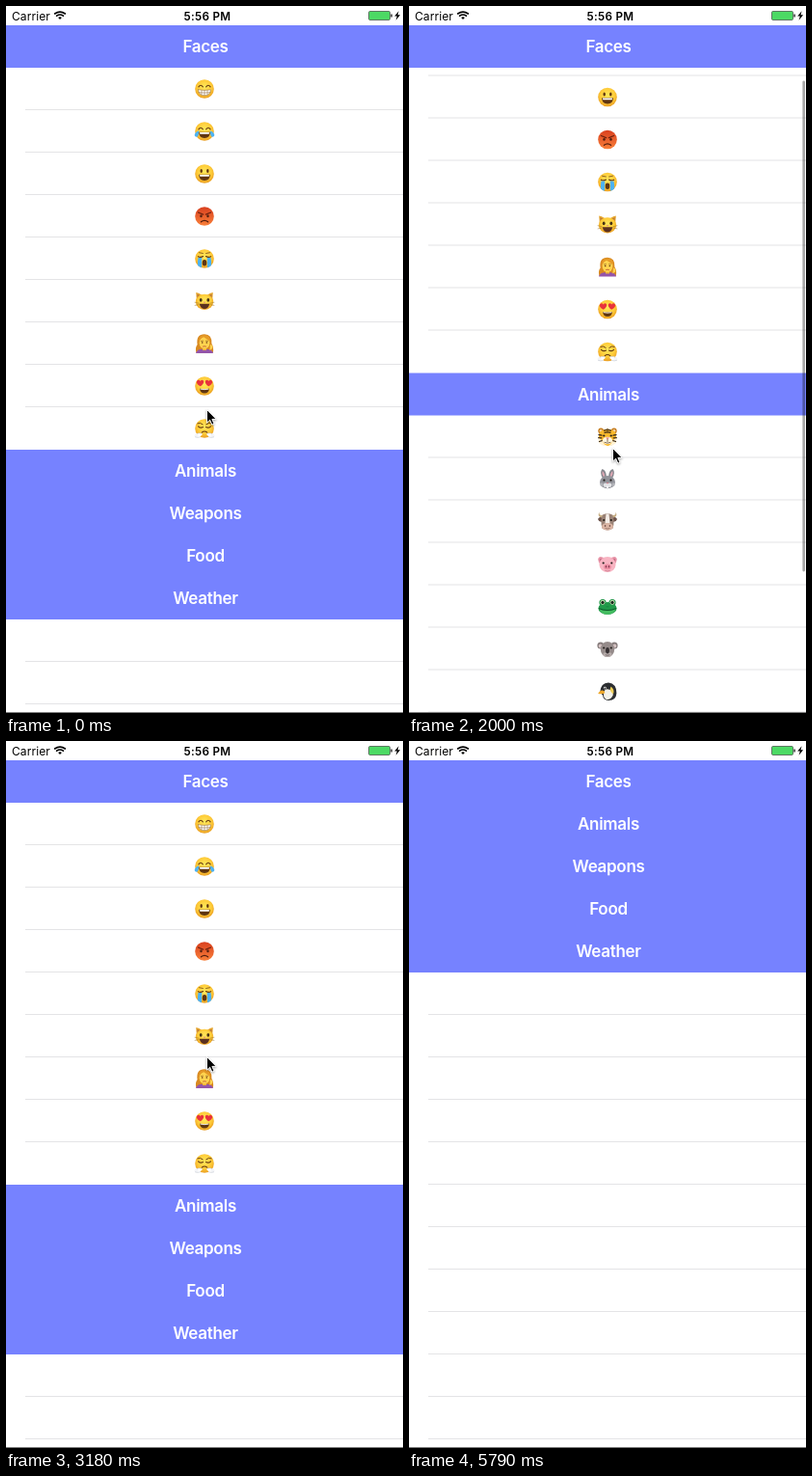
These frames come from a looping animation (412 by 733 pixels, 6390 ms). An HTML page:

```html
<!DOCTYPE html>
<html lang="en">
<head>
<meta charset="utf-8">
<title>Emoji list</title>
<style>
  html, body { margin: 0; width: 100%; height: 100%; overflow: hidden; background: #fff; }
  svg { display: block; }
  text { font-family: Inter, Roboto, "Liberation Sans", sans-serif; }
  .title { font-size: 17px; font-weight: 600; letter-spacing: -.3px; fill: #fff; text-anchor: middle; }
</style>
</head>
<body>
<svg id="stage" width="412" height="733" viewBox="0 0 412 733">
  <defs>
    <radialGradient id="yellow" cx=".5" cy=".4" r=".62">
      <stop offset="0" stop-color="#ffe95c"/><stop offset=".6" stop-color="#fecb38"/><stop offset="1" stop-color="#e89a20"/>
    </radialGradient>
    <linearGradient id="red" x2="0" y2="1">
      <stop offset="0" stop-color="#d9401f"/><stop offset="1" stop-color="#f9803a"/>
    </linearGradient>
  </defs>
</svg>
<script>
const LOOP = 6390, ROW = 44, HEAD = '#7682ff', LINE = '#e4e4e6';
const BROWN = '#5f3510', BLUE = '#4db2f2', Y = 'url(#yellow)';

// Shape helpers, all returning SVG markup
const oval = (x, y, rx, ry, fill) => `<ellipse cx="${x}" cy="${y}" rx="${rx}" ry="${ry}" fill="${fill}"/>`;
const dot = (x, y, r, fill) => oval(x, y, r, r, fill);
const fillPath = (d, fill) => `<path d="${d}" fill="${fill}"/>`;
const stroke = (d, color = BROWN, w = 1.1) =>
  `<path d="${d}" fill="none" stroke="${color}" stroke-width="${w}" stroke-linecap="round" stroke-linejoin="round"/>`;
const twin = s => s + `<g transform="scale(-1 1)">${s}</g>`;
const rect = (x, y, w, h, fill) => `<rect x="${x}" y="${y}" width="${w}" height="${h}" fill="${fill}"/>`;
const group = (s, x = 0, y = 0, id = '') => `<g ${id && `id="${id}"`} transform="translate(${x} ${y})">${s}</g>`;

const ball = dot(0, 0, 9.8, Y);
const eyes = (y, color = BROWN) => twin(oval(3.3, y, 1.2, 1.9, color));
const happyEyes = twin(stroke('M1.7 -2.2Q3.9 -5.2 6.1 -2.2'));
const laugh = fillPath('M-6 .8H6Q5.6 7 0 7T-6 .8Z', BROWN) + fillPath('M-5.2 1H5.2L4.7 2.8H-4.7Z', '#fff');
const heart = twin(fillPath('M4.2 .2C-.2 -2.4 .2 -6.2 2.4 -6.2Q3.7 -6.2 4.3 -5Q5.2 -6.6 6.9 -6.1C9.4 -5 8 -1.6 4.2 .2Z', '#e8323c'));

const faces = [
  ball + happyEyes + fillPath('M-6.5 .8Q0 2 6.5 .8Q6 6.8 0 6.8T-6.5 .8Z', '#fff')
    + stroke('M-6.5 .8Q0 2 6.5 .8Q6 6.8 0 6.8T-6.5 .8ZM-6 3.6Q0 4.6 6 3.6M-3 1.5V6M0 1.5V6.6M3 1.5V6', '#9a7a52', .6),
  ball + happyEyes + laugh + twin(fillPath('M5.6 -.8Q11.2 1.2 10.1 4.8Q8 7 6.5 4.2Z', BLUE)),
  ball + eyes(-3) + laugh,
  dot(0, 0, 9.8, 'url(#red)') + twin(stroke('M1.4 -1.8L6.6 -4', '#70210f', 1.3) + oval(3.5, -.2, 1.2, 1.5, '#54200f'))
    + stroke('M-3.6 5.8Q0 2.8 3.6 5.8', '#54200f', 1.2),
  ball + twin(stroke('M1.6 -5.5L5.5 -6.3', BROWN, .7) + stroke('M1.5 -2.5Q4 -.8 6.7 -2.3')
    + fillPath('M2.7 -1H6.6Q7.3 3 7 7.1Q5 8.9 3 9.3Z', BLUE)) + oval(0, 4.2, 2.3, 3.2, BROWN),
  twin(fillPath('M-8.8 -9Q-2.8 -7.6 -1 -4L-8 1Z', '#e5a52c') + fillPath('M-7.6 -7.3L-3.8 -5.2L-7.2 -2Z', '#b9763a'))
    + oval(0, .8, 9.2, 8.1, Y) + twin(oval(3.8, -1.2, 1.4, 1.9, '#473315') + stroke('M6 2.2L10 1.3M6 3.6L9.9 4.4', '#967026', .5))
    + fillPath('M-5.3 2.8H5.3Q4 8 0 8T-5.3 2.8Z', '#5b3020') + fillPath('M-1.4 .7H1.4L0 2.1Z', '#db7584'),
  fillPath('M-8.6 9.5Q-10 4 -7.4 1Q-9 -9.6 0 -9.8Q8 -9.6 7.4 0Q10 4.2 8.8 9.5Z', '#d98a20')
    + fillPath('M-9 10Q-8 5.8 -2 5.7H3Q8 6 9 10Z', '#9455a9') + rect(-2, 3, 4, 4, '#eeb43a')
    + oval(0, -.7, 5.4, 6.2, '#ffd34f') + fillPath('M-6 -1Q-5.5 -5 -1 -7Q3 -4 6 -2Q6 -8.5 0 -8.8T-6 -1Z', '#e69b27')
    + twin(dot(2.3, -1, .8, BROWN) + stroke('M1.5 -2.8L3.5 -2.6', BROWN, .5)) + stroke('M-1.5 3Q0 2.2 1.5 3', '#b64d35', .8)
    + fillPath('M6 1Q8.7 1 8.2 5L5.3 7Z', '#ffd34f'),
  ball + heart + fillPath('M-5 2.4Q0 3.8 5 2.4Q4.6 7.4 0 7.4T-5 2.4Z', BROWN) + stroke('M-4 3.2Q0 4.2 4 3.2', '#fff', .9),
  ball + twin(stroke('M1.7 -4.1Q4.4 -6.8 7.2 -5.2', BROWN, .9) + stroke('M1.5 -1.5Q4 .1 6.5 -2.2')
    + dot(6, 7.1, 2.4, '#fff') + dot(8.4, 7.6, 2, '#f4f5f8') + dot(3.7, 6.1, 1.3, '#fff')
    + stroke('M3 5.2Q6 4 7.8 5.6M4.3 8.8Q7 10.2 9.6 8.9', '#b9bec8', .5)) + stroke('M-2.8 4.2Q0 1.8 2.8 4.2')
];

const muzzle = (fill, y = 4) => oval(0, y, 5.1, 3.8, fill);
const beadEyes = (x, y, r = 1.1) => twin(dot(x, y, r, '#25201d'));
const animals = [
  twin(dot(6.8, -6, 2.9, '#c57d20') + dot(6.8, -6, 1.5, '#f8d7b1'))
    + fillPath('M-8 -5Q0 -11 8 -5Q10 1 8.7 6Q4 9.8 0 9.6T-8.7 6Q-10 1 -8 -5Z', '#f9b92c')
    + twin(fillPath('M9 1L6 3.5Q4 8 1 9.4Q6 10 9 6Z', '#fff2d4')) + muzzle('#fff6df')
    + twin(stroke('M9 -2L6 -1.3M9.3 1.2L6.2 1.3M8.5 5L5.8 4.2M1.2 -7L3.4 -6.3M1.2 -4.6L3 -4.1', '#3d2b18', 1.3))
    + stroke('M0 -8V-4', '#3d2b18', 1.2) + beadEyes(3.7, -1) + fillPath('M-1.8 1H1.8L0 3Z', '#d5707a')
    + stroke('M0 3V5M-3 6Q0 7.5 3 6', '#4a321c', .7),
  twin(fillPath('M1.1 -2Q1.2 -9.4 5.5 -10.5Q8.6 -7 5 -1Z', '#85868d') + fillPath('M2.8 -3Q3 -7 5.3 -8.3Q6.3 -6 4.2 -2.6Z', '#dea8b4'))
    + oval(0, 3.2, 8, 6.6, '#92939a') + twin(oval(2, 6.3, 2.3, 2.2, '#e4e4e7') + oval(5.9, 5.8, 1.6, 2, '#b2b3b8'))
    + beadEyes(3.5, 1.2) + fillPath('M-1.2 3.5H1.2L0 4.9Z', '#d87786') + rect(-.9, 7.4, 1.8, 2, '#fff'),
  twin(fillPath('M4 -7Q9 -5.5 8.5 -10Q11 -5 6 -3.8Z', '#c6ad83') + fillPath('M5 -3Q8 -6 10 -2.5Q8.8 1 5.3 0Z', '#6b5148'))
    + fillPath('M-5 -7Q0 -9.5 5 -7Q7.8 -1 5.6 7Q0 11 -5.6 7Q-7.8 -1 -5 -7Z', '#9a8276')
    + fillPath('M-1.5 -8H1.5L2.5 2H-2.5Z', '#f5eee8') + beadEyes(3.8, -1.5) + oval(0, 5.2, 6, 3.8, '#dbb5a4')
    + twin(oval(2.4, 4.5, .8, 1.1, '#75544b')) + stroke('M-2 7.2Q0 8 2 7.2', '#75544b', .6),
  twin(fillPath('M2.8 -6Q9 -9.7 9.8 -4.7Q9.8 -1.4 6.6 1Z', '#e894a8') + fillPath('M5 -5Q8 -7 8.3 -3.8L7 -1Z', '#c96f87'))
    + oval(0, .6, 8.6, 8, '#f8b4c2') + beadEyes(4.3, -1) + oval(0, 2.9, 3.9, 2.9, '#ed8fa4')
    + twin(oval(1.5, 2.8, .7, 1.2, '#8a3d53')) + stroke('M-2.4 7Q0 8 2.4 7', '#bd647b', .6),
  oval(0, 2, 9.6, 6.4, '#219a4a') + twin(dot(5, -4, 3.6, '#23984a') + dot(5, -4.2, 2.4, '#e9f1cb') + dot(5, -4.1, 1.7, '#172a1c'))
    + fillPath('M-8.6 3Q0 6.2 8.6 3Q6 8.3 0 8.4T-8.6 3Z', '#45bd61') + stroke('M-8.7 2.2Q0 6 8.7 2.2', '#0c5228', .9)
    + twin(dot(.9, .3, .4, '#0c5228')),
  twin(dot(7.1, -3.4, 3.5, '#857b7b') + dot(7.3, -3, 2, '#d4c2c2')) + oval(0, .5, 7.2, 8, '#958b8a')
    + oval(0, 6, 4.5, 2.4, '#b8aead') + beadEyes(3.8, -1) + oval(0, 1.8, 1.9, 3.3, '#352f31') + stroke('M-2 6.4Q0 7.4 2 6.4', '#4d4141', .6),
  fillPath('M-7.8 1Q-7 -9 1 -9Q9.5 -8 9.4 2Q9 9.6 1 9.5Q-4.5 9 -5 4Z', '#2c2e31')
    + fillPath('M-4 2Q-3 -3 1 -2Q6 -1 5.8 4Q3 9.3 -1 8.5Q-4.5 7 -4 2Z', '#f4f2e9')
    + fillPath('M3.5 -5Q7.8 -2 6 3Q3 1 2.6 -2Z', '#f0d05a') + fillPath('M-9.8 2.6Q-7.8 -2 -3.6 -.6L-2.6 1.7Q-5 3.4 -9.8 2.6Z', '#efa92c')
    + dot(-2.7, -3.4, 1.4, '#fff') + dot(-2.8, -3.3, .8, '#111'),
  twin(stroke('M1.4 4Q1.5 7.8 3.2 8.8M3.6 3Q4 8 7 8.4M5.5 2Q6.2 5.8 9.2 4.8', '#a94252', 2.5))
    + oval(0, -2.3, 6.9, 7.4, '#bd5260') + rect(-4.8, 1, 9.6, 5, '#b54b5a')
    + oval(-2, -6, 2, 1.4, '#d97a83') + twin(dot(2.7, 0, 1.5, '#f4dfdb') + dot(2.6, 0, .9, '#33191f')) + stroke('M-1.5 3.3Q0 4 1.5 3.3', '#712936', .7),
  oval(-3, -5.4, 3.8, 3.6, '#cbd6dc') + oval(3.5, -5.7, 3.8, 3.6, '#dce4e8') + oval(1, 1.6, 8.6, 5.6, '#f5bf32')
    + stroke('M-1 -3V6M3 -3V6.4M6.8 -1.6V4.6', '#342a20', 1.9) + dot(-5.6, .6, 4, '#382d22') + dot(-7, .2, 1, '#fff')
    + stroke('M-6 -3Q-7 -6 -8.5 -6.2M-4.7 -3Q-4.8 -6.2 -6 -7.5', '#342a20', .7)
];

const sep = y => rect(20, y, 392, 1, LINE);
const header = (name, y, id) => group(rect(0, 0, 412, ROW, HEAD) + `<text class="title" x="207" y="28.2">${name}</text>`, 0, y, id);
const rows = list => list.map((art, i) =>
  group(art, 206, i * ROW + 22) + (i < list.length - 1 ? sep(i * ROW + 43) : '')).join('');
const lines = (n, y) => Array.from({ length: n }, (_, i) => sep(y + i * ROW)).join('');

const statusBar = rect(0, 0, 412, 20, '#fff')
  + '<text x="6" y="14.6" font-size="12" letter-spacing=".1">Carrier</text>'
  + '<text x="209" y="14.5" font-size="11.7" font-weight="600" letter-spacing=".3" text-anchor="middle">5:56 PM</text>'
  + group(fillPath('M0 3.6L-1.9 1.5Q0 .2 1.9 1.5Z', '#000') + stroke('M-3.4 -.2Q0 -2.6 3.4 -.2M-5.4 -2.4Q0 -6.2 5.4 -2.4', '#000', 1.6), 56, 10.4)
  + '<rect x="376.5" y="5.5" width="22" height="9" rx="1.2" fill="#4cd964" stroke="#4b5a4e" stroke-width=".8"/>'
  + rect(399.4, 8.5, 1.4, 3, '#222') + fillPath('M407.6 5.3L403.2 10.6H405.8L404.6 14.8L409.1 9.2H406.5Z', '#000');

const arrow = '<path d="M.4 .4V14.2L3.6 11.2L5.8 16.2L8 15.2L5.9 10.4H10.2Z" stroke="#fff" stroke-width="1" '
  + 'style="filter:drop-shadow(0 1px 1px rgba(0,0,0,.35))"/>';

const stage = document.getElementById('stage');
stage.insertAdjacentHTML('beforeend',
  rect(0, 0, 412, 733, '#fff')
  + group(rows(faces), 0, 64, 'faces')
  + group(rows(animals), 0, 504, 'animals')
  + header('Animals', 460, 'animalsHead')
  + group(rect(0, 132, 412, 640, '#fff') + ['Weapons', 'Food', 'Weather'].map((n, i) => header(n, i * ROW, '')).join('')
    + `<g id="blanks">${lines(12, 175)}</g>`, 0, 504, 'tail')
  + `<g id="lateLines" opacity=".55">${lines(3, 623)}</g>`
  + header('Faces', 20, '') + statusBar
  + '<rect id="bar" x="408.4" width="2.6" height="509" rx="1.3" fill="#000"/>'
  + rect(0, 732, 412, 1, '#7c7c7c')
  + group(arrow, 0, 0, 'pointer'));

// Each track holds its value until the next entry: [time, value...]
const pointerTrack = [
  [0, 208, 418], [110, 203, 448], [230, 199, 471], [1290, 199, 505], [1410, 200, 562], [1520, 200, 582],
  [1880, 206, 540], [2000, 211, 458], [2110, 213, 420], [2230, 213, 406], [2350, 212, 400], [2470, 211, 396],
  [2590, 207, 362], [2710, 206, 336], [2820, 208, 327],
  [3420, 215, 290], [3540, 229, 190], [3660, 222, 110], [3780, 210, 62], [3890, 206, 51],
  [4490, 245, 155], [4610, 316, 437], [4730, 344, 586], [4840, 359, 655], [4960, 370, 700], [5080, 374, 708],
  [5200, -50, -50]
];
const scrollTrack = [[0, 0], [1880, 20], [2000, 79.5], [2110, 117], [2230, 136], [2350, 145], [2470, 147.5], [3180, 0]];
const barTrack = [[0, 0], [1880, .35], [2590, .23], [2710, .11], [2820, 0]];
const openTrack = [[0, 0], [590, .08], [710, .55], [820, .93], [930, 1], [3180, 0]];
const closedTrack = [[0, 0], [4250, 1], [4490, 2]];

const at = (track, t) => track.findLast(step => step[0] <= t).slice(1);
const $ = id => document.getElementById(id);
const move = (id, x, y) => $(id).setAttribute('transform', `translate(${x} ${y})`);
const show = (id, alpha) => $(id).setAttribute('opacity', alpha);

function draw(t) {
  const [scroll] = at(scrollTrack, t), [open] = at(openTrack, t), [closed] = at(closedTrack, t);
  const top = closed ? 64 : 460 - scroll;
  move('faces', 0, 64 - scroll);
  show('faces', closed ? 0 : 1);
  move('animalsHead', 0, top);
  move('animals', 0, top + ROW);
  show('animals', open);
  move('tail', 0, top + ROW + open * animals.length * ROW);
  show('blanks', closed === 1 ? 0 : 1);
  show('lateLines', closed === 1 ? .55 : 0);
  $('bar').setAttribute('y', 21.4 + scroll * 713 / 1012);
  show('bar', at(barTrack, t)[0]);
  move('pointer', ...at(pointerTrack, t));
}

const start = performance.now();
function tick() {
  draw((performance.now() - start) % LOOP);
  requestAnimationFrame(tick);
}
tick();
</script>
</body>
</html>
```
